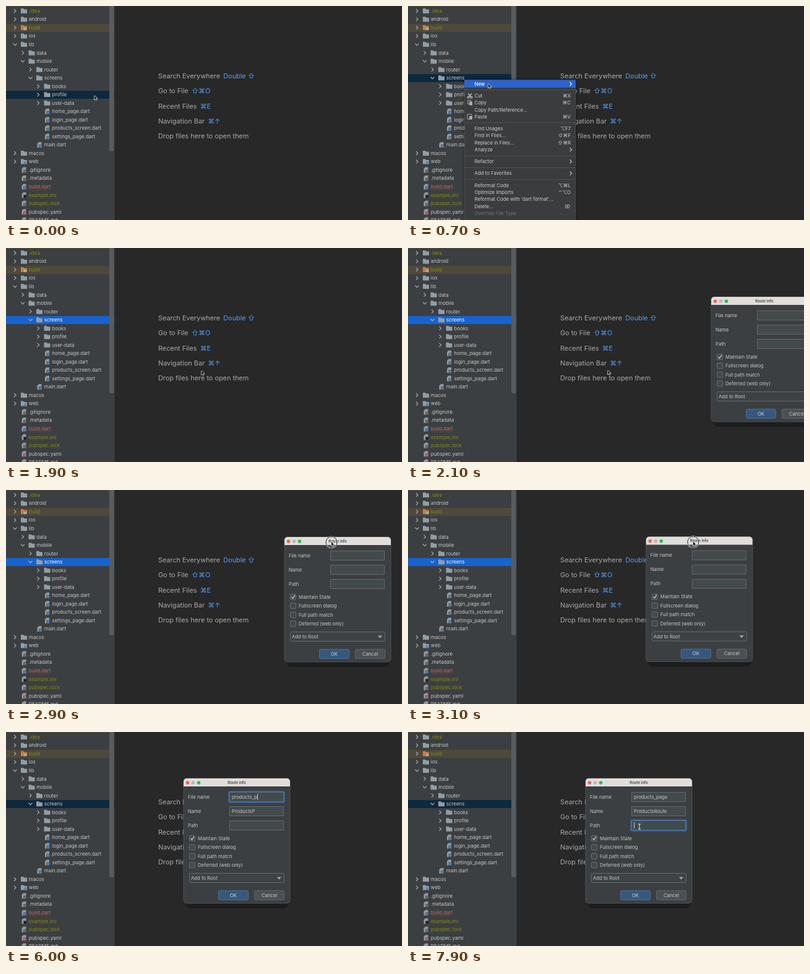
Recreate the animation shown at these times as an HTML page with a canvas. Size 640x346 px, loop 8 s.

```html
<!DOCTYPE html>
<html lang="en">
<head>
<meta charset="utf-8">
<style>
html, body { margin: 0; overflow: hidden; background: #282828; }
canvas { display: block; }
</style>
</head>
<body>
<canvas id="stage" width="640" height="346"></canvas>
<script>
const ctx = document.getElementById('stage').getContext('2d');
const LOOP = 8000, STEP = 100;
const OLIVE = '#858a14', BLUE = '#4487c4', ORANGE = '#c9803c', GRAY = '#c4c6c7';
const RIGHT_CLICK = 450, MENU_END = 1900, DIALOG_START = 2000;
const DRAG_START = 2700, DRAG_END = 3400, FOCUS_FILE = 3600, FOCUS_PATH = 7700;

// Tree rows: indent level, label, kind (> closed, v open, f file), label colour, badge colour
const tree = [
  [0, '.idea', '>', OLIVE], [0, 'android', '>'], [0, 'build', '>', OLIVE, ORANGE], [0, 'ios', '>'],
  [0, 'lib', 'v'], [1, 'data', '>'], [1, 'mobile', 'v'], [2, 'router', '>'], [2, 'screens', 'v'],
  [3, 'books', '>'], [3, 'profile', '>'], [3, 'user-data', '>'],
  [3, 'home_page.dart', 'f', , BLUE], [3, 'login_page.dart', 'f', , BLUE],
  [3, 'products_screen.dart', 'f', , BLUE], [3, 'settings_page.dart', 'f', , BLUE],
  [2, 'main.dart', 'f', , BLUE], [0, 'macos', '>'], [0, 'web', '>', , BLUE],
  [0, '.gitignore', 'f', , '#6c7073'], [0, '.metadata', 'f', , '#6c7073'],
  [0, 'build.dart', 'f', '#d0665c', BLUE], [0, 'example.iml', 'f', OLIVE, '#17191a'],
  [0, 'pubspec.lock', 'f', OLIVE, '#6c7073'], [0, 'pubspec.yaml', 'f', , '#d0607c'],
  [0, 'README.md', 'f', , BLUE]
];
const hints = [['Search Everywhere', 'Double ⇧'], ['Go to File', '⇧⌘O'], ['Recent Files', '⌘E'],
  ['Navigation Bar', '⌘↑'], ['Drop files here to open them', '']];

// Menu entries: label, shortcut, icon; null is a separator
const mainMenu = [['New', '>'], null, ['Cut', '⌘X', 'cut'], ['Copy', '⌘C', 'copy'],
  ['Copy Path/Reference...'], ['Paste', '⌘V', 'paste'], null, ['Find Usages', '⌥F7'],
  ['Find in Files...', '⇧⌘F'], ['Replace in Files...', '⇧⌘R'], ['Analyze', '>'], null,
  ['Refactor', '>'], null, ['Add to Favorites', '>'], null, ['Reformat Code', '⌥⌘L'],
  ['Optimize Imports', '⌃⌥O'], ["Reformat Code with 'dart format'..."], ['Delete...', '⌦'], ['Override File Type']];
const subMenu = [['C++ Class', '', 'class'], null, ['C/C++ Source File', '', BLUE],
  ['C/C++ Header File', '', ORANGE], null, ['Json2Dart', '', 'json'], ['File', '', 'page'],
  ['AutoRoute Page', '', 'page'], ['Scratch File', '⇧⌘N', BLUE], ['Directory', '', 'folder'], null,
  ['Kotlin Script', '', BLUE], ['Kotlin Worksheet', '', BLUE], ['Dart File', '', BLUE],
  ['Resource Bundle', '', ORANGE], ['EditorConfig File', '', 'gear'], ['Arb File', '', 'arb']];

const mousePath = [[0, 143, 145], [100, 143, 145], [400, 91, 118], [550, 92, 119], [700, 130, 126],
  [900, 262, 126], [1000, 285, 127], [1300, 284, 225], [1450, 286, 225], [1700, 312, 198],
  [2000, 318, 199], [2100, 323, 198], [2600, 566, 87], [2700, 566, 87], [2900, 526, 84],
  [3400, 363, 83], [3600, 384, 104], [7100, 384, 104], [7600, 374, 153], [8000, 374, 153]];
const keyTimes = [...Array.from({ length: 8 }, (_, i) => 4200 + i * 100), 5800, 6000, 6100, 6200, 6300];

function mouseAt(t) {
  const i = Math.max(1, mousePath.findIndex(p => p[0] >= t));
  const [t0, x0, y0] = mousePath[i - 1], [t1, x1, y1] = mousePath[i];
  const u = (t - t0) / (t1 - t0);
  return [x0 + (x1 - x0) * u, y0 + (y1 - y0) * u];
}

function text(s, x, y, size, color = GRAY, align = 'left', weight = 400) {
  ctx.font = `${weight} ${size}px Inter, "DejaVu Sans", sans-serif`;
  ctx.fillStyle = color;
  ctx.textAlign = align;
  ctx.fillText(s, x, y + size * 0.36);
  return ctx.measureText(s).width;
}
function rect(x, y, w, h, color) {
  ctx.fillStyle = color;
  ctx.fillRect(x, y, w, h);
}
function box(x, y, w, h, r, fill, stroke, line = 1) {
  ctx.beginPath();
  ctx.roundRect(x, y, w, h, r);
  if (fill) { ctx.fillStyle = fill; ctx.fill(); }
  if (stroke) { ctx.strokeStyle = stroke; ctx.lineWidth = line; ctx.stroke(); }
}
function disc(x, y, r, color) {
  ctx.beginPath();
  ctx.arc(x, y, r, 0, 7);
  ctx.fillStyle = color;
  ctx.fill();
}
function line(points, color, width = 1) {
  ctx.beginPath();
  points.forEach(([x, y]) => ctx.lineTo(x, y));
  ctx.strokeStyle = color;
  ctx.lineWidth = width;
  ctx.stroke();
}
function poly(points, color) {
  ctx.beginPath();
  points.forEach(([x, y]) => ctx.lineTo(x, y));
  ctx.closePath();
  ctx.fillStyle = color;
  ctx.fill();
}

function chevron(x, y, open, color = '#b0b3b5') {
  line(open ? [[x - 3, y - 1.5], [x, y + 1.5], [x + 3, y - 1.5]]
            : [[x - 1.5, y - 3], [x + 1.5, y], [x - 1.5, y + 3]], color, 1.1);
}
function folder(x, y, badge) {
  const color = badge === ORANGE ? ORANGE : '#929ea6';
  poly([[x - 5, y - 4], [x - 1, y - 4], [x + 0.5, y - 2.5], [x + 5, y - 2.5], [x + 5, y + 4], [x - 5, y + 4]], color);
  if (badge) rect(x, y, 4, 4, badge === ORANGE ? '#a5aeb3' : badge);
}
function page(x, y, badge, color = '#929a9f') {
  poly([[x - 1, y - 4.5], [x + 3.5, y - 4.5], [x + 3.5, y + 4.5], [x - 3.5, y + 4.5], [x - 3.5, y - 2]], color);
  if (badge) box(x - 0.5, y, 4.5, 4.5, 0, badge, '#4a4e50', 0.8);
}
function icon(kind, x, y) {
  if (kind === 'folder') folder(x, y);
  else if (kind === 'page') page(x, y);
  else if (kind === 'json') box(x - 4, y - 4.5, 8, 9, 1, '#eeeeee');
  else if (kind === 'class') box(x - 4, y - 4, 8, 8, 1, '#66727c');
  else if (kind === 'gear') {
    ctx.setLineDash([1.5, 1.1]);
    box(x - 3.5, y - 3.5, 7, 7, 3.5, null, '#a9afb3', 1.6);
    ctx.setLineDash([]);
    box(x - 2.5, y - 2.5, 5, 5, 2.5, null, '#a9afb3', 1.4);
  } else if (kind === 'arb') poly([[x, y - 2.5], [x + 2.5, y + 2.5], [x, y + 1], [x - 2.5, y + 2.5]], '#aeb3b6');
  else if (kind === 'cut') {
    line([[x - 3, y - 4], [x + 2, y + 2]], '#b5babd', 1.4);
    line([[x + 3, y - 4], [x - 2, y + 2]], '#b5babd', 1.4);
    box(x - 4, y + 1, 3, 3, 1.5, null, '#b5babd', 1.2);
    box(x + 1, y + 1, 3, 3, 1.5, null, '#b5babd', 1.2);
  } else if (kind === 'copy') {
    box(x - 3.5, y - 4, 5, 6, 0.5, null, '#a9afb3');
    box(x - 1, y - 2, 5, 6, 0.5, '#a9afb3');
  } else if (kind === 'paste') {
    box(x - 4, y - 4, 7, 8, 0.5, null, '#a9afb3');
    rect(x - 1, y - 1, 5, 5, '#a9afb3');
  } else page(x, y, kind);
}

function drawTree(t) {
  const rowY = i => 8 + 13.53 * i;
  const fillRow = (i, color) => rect(0, Math.ceil(rowY(i) - 6.8), 176, 13, color);
  rect(0, 0, 176, 346, '#3c3f41');
  rect(0, 0, 176, 1, '#4f493c');
  fillRow(2, '#4f493c');
  const active = t >= MENU_END && t < FOCUS_FILE;
  fillRow(t < RIGHT_CLICK ? 10 : 8, active ? '#1763cf' : '#0d293e');
  tree.forEach(([level, label, kind, color, badge], i) => {
    const x = 14.5 + 12.5 * level, y = rowY(i);
    if (kind === 'f') page(x + 14.5, y, badge);
    else {
      chevron(x, y, kind === 'v');
      folder(x + 14.5, y, badge);
    }
    text(label, x + 22.3, y, 7.93, active && i === 8 ? '#ffffff' : color);
  });
  const wave = Array.from({ length: 18 }, (_, i) => [37 + i * 2, 296.5 + i % 2]);
  line(wave, '#b9504a55', 0.8);
  box(167, -6, 7.5, 241, 3, '#595c5e');
  rect(175, 0, 1, 346, '#313335');
}

function drawHints() {
  hints.forEach(([label, keys], i) => {
    const y = 113.1 + 24.3 * i;
    const w = text(label, 246, y, 10.87, '#a9a9a9');
    text(keys, 246 + w + 5.2, y, 10.87, '#589df6');
  });
}

function drawMenu(items, x, w, h, isHot) {
  ctx.shadowColor = '#0006';
  ctx.shadowBlur = 5;
  box(x, 119, w, h, 1, '#3a3c3e');
  ctx.shadowBlur = 0;
  box(x + 0.5, 119.5, w - 1, h - 1, 1, null, '#4a4c4e');
  let y = 126;
  for (const item of items) {
    if (!item) {
      rect(x + 1, Math.round(y - 2), w - 2, 1, '#4e5052');
      y += 7.9;
      continue;
    }
    const [label, keys, kind] = item, hot = isHot(label, y);
    if (hot) rect(x, Math.round(y - 5.9), w, 12, '#2a63d0');
    const color = hot ? '#ffffff' : label === 'Override File Type' ? '#717375' : '#cccecf';
    if (kind) icon(kind, x + 9, y);
    text(label, x + 16.5, y, 7.8, color, 'left', hot ? 500 : 400);
    if (keys === '>') chevron(x + w - 8, y, false, color);
    else if (keys) text(keys, x + w - 8, y, 7.8, color, 'right');
    y += 11.3;
  }
}

function drawField(x, y, value, focused, caret) {
  box(x + 0.5, y + 0.5, 87, 15, 0, '#434a4b', '#62696b');
  if (focused) box(x - 0.5, y - 0.5, 89, 17, 1.5, null, '#3a70ae', 2);
  const w = text(value, x + 4, y + 8.3, 7.7);
  if (caret) rect(Math.round(x + 4 + w), y + 3, 1, 10, '#d0d2d3');
}

function drawDialog(t, x, y) {
  const typed = keyTimes.filter(k => k <= t).length;
  const file = 'products_page'.slice(0, typed);
  const name = typed === 13 ? 'ProductsRoute'
    : file.split('_').map(s => s.charAt(0).toUpperCase() + s.slice(1)).join('');
  const focus = t < FOCUS_FILE ? -1 : t < FOCUS_PATH ? 0 : 2;
  const lastInput = [FOCUS_FILE, ...keyTimes, FOCUS_PATH].filter(k => k <= t).pop();
  const caretOn = Math.floor((t - lastInput) / 400) % 2 === 0;

  ctx.save();
  ctx.translate(x, y);
  box(3, 20, 167, 190, 8, '#1d1d1d');
  box(0, 0, 172, 202, 5, '#3c3f41', '#55585a', 0.8);
  box(0, 0, 172, 13, [5, 5, 0, 0], '#e0dddb');
  ['#ec6259', '#bdb5b2', '#2fbb4c'].forEach((c, i) => disc(6.5 + 9 * i, 7, 2.8, c));
  text('Route info', 86, 6.5, 6, '#444444', 'center', 600);

  [['File name', file], ['Name', name], ['Path', '']].forEach(([label, value], i) => {
    text(label, 7, 30 + 23 * i, 7.7);
    drawField(74, 22 + 23 * i, value, focus === i, focus === i && caretOn);
  });
  ['Maintain State', 'Fullscreen dialog', 'Full path match', 'Deferred (web only)'].forEach((label, i) => {
    const cy = 97 + 14.4 * i;
    box(9.5, cy - 4.5, 9, 9, 1, '#43494a', '#6b6f71');
    if (i === 0) line([[11.5, cy], [13.5, cy + 2.3], [17, cy - 3]], '#d0d2d3', 1.3);
    text(label, 23, cy, 7.7);
  });
  box(9.5, 153.5, 153, 15, 1, '#3e4244', '#65696b');
  text('Add to Root', 12, 161.5, 7.7);
  poly([[151, 159.5], [158, 159.5], [154.5, 163.5]], '#a7abad');
  box(56.5, 181.5, 48, 15, 2, '#365880', '#4c708c');
  text('OK', 80.5, 189, 7.7, '#d0d4d8', 'center');
  box(114.5, 181.5, 48, 15, 2, '#4c5052', '#626567');
  text('Cancel', 138.5, 189, 7.7, GRAY, 'center');
  ctx.restore();
}

function drawMouse(t, x, y, overField) {
  if (t >= keyTimes[0] && t < 7100) return;
  const pressed = t >= DRAG_START && t < DRAG_END ||
    [RIGHT_CLICK, 1750, FOCUS_FILE, FOCUS_PATH].some(c => t >= c && t < c + 130);
  if (pressed) {
    box(x - 9, y - 8.5, 18, 18, 9, null, '#f0f0f0', 2);
    box(x - 9, y - 8.5, 18, 18, 9, null, '#161616', 1);
  }
  if (overField) {
    line([[x, y - 4], [x, y + 4]], '#e4e4e4');
    line([[x - 2, y - 4], [x + 2, y - 4]], '#e4e4e4');
    line([[x - 2, y + 4], [x + 2, y + 4]], '#e4e4e4');
    return;
  }
  const arrow = [[0, 0], [0, 6], [1.4, 4.8], [2.4, 6.8], [3.3, 6.4], [2.4, 4.3], [4.2, 4.2], [0, 0]]
    .map(([dx, dy]) => [x + dx, y + dy]);
  line(arrow, '#e8e8e8', 1.3);
  poly(arrow, '#111111');
}

function draw(now) {
  const t = Math.floor(now % LOOP / STEP) * STEP;
  const [mx, my] = mouseAt(t);
  rect(0, 0, 640, 346, '#282828');
  drawHints();
  drawTree(t);
  if (t > RIGHT_CLICK && t < MENU_END) {
    drawMenu(mainMenu, 91, 180, 240, label => label === 'New' && t >= 700);
    if (t >= 800) drawMenu(subMenu, 271, 103, 185, (_, y) => mx > 271 && Math.abs(my - y) < 5.7);
  }
  let overField = false;
  if (t >= DIALOG_START) {
    const [gx, gy] = mouseAt(Math.min(Math.max(t, DRAG_START), DRAG_END));
    const x = gx - 76, y = gy - 8;
    drawDialog(t, x, y);
    overField = mx > x + 74 && mx < x + 162 && [22, 45, 68].some(f => my > y + f && my < y + f + 16);
  }
  drawMouse(t, mx, my, overField);
}

const start = performance.now();
(function tick() {
  draw(performance.now() - start);
  requestAnimationFrame(tick);
})();
</script>
</body>
</html>
```
